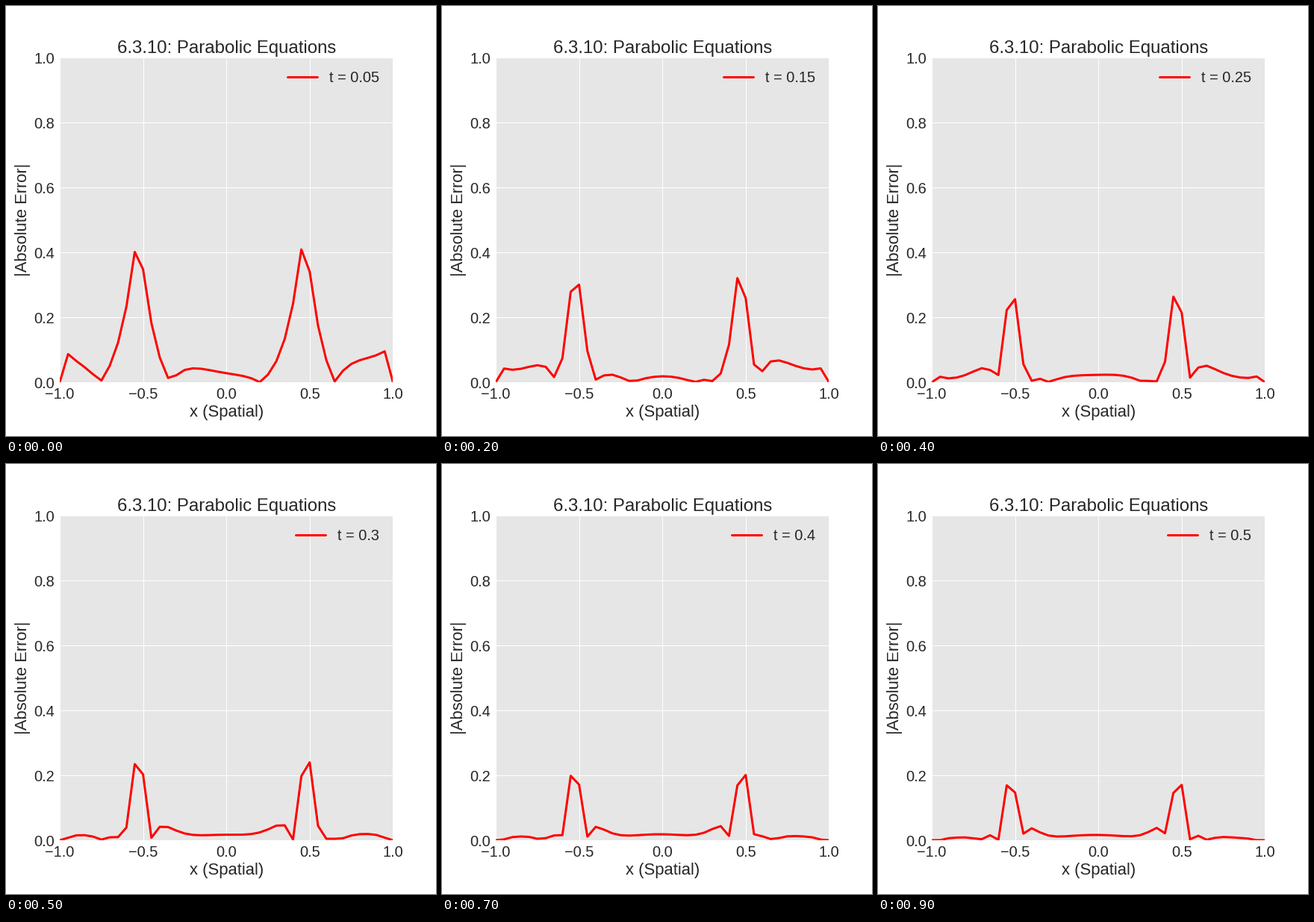
A matplotlib script for the animation above (1000 ms loop, 576 by 576 pixels).

```python
import numpy as np
import matplotlib.pyplot as plt
from matplotlib.animation import FuncAnimation

STEP = 0.05            # time step, equal to the grid spacing
FRAMES = 10
INK = "#262626"
x = np.linspace(-1, 1, 41)


def exact(t):
    """Fourier solution of u_t = u_xx for a square pulse on |x| < 1/2."""
    l = np.arange(60)
    freq = np.pi * (2 * l + 1)
    weights = 2 * (-1.0) ** l / freq * np.exp(-freq ** 2 * t)
    return 0.5 + np.cos(np.outer(x, freq)) @ weights


def crank_nicolson_errors():
    """Absolute error after each step; edges are refreshed after the solve."""
    n = len(x)
    mu = STEP / (x[1] - x[0]) ** 2
    laplacian = np.eye(n, k=1) - 2 * np.eye(n) + np.eye(n, k=-1)
    laplacian[[0, -1]] = 0
    implicit = np.eye(n) - mu / 2 * laplacian
    explicit = np.eye(n) + mu / 2 * laplacian
    u = np.zeros(n)
    u[10:30] = 1       # pulse on [-0.5, 0.5)
    errors = []
    for i in range(1, FRAMES + 1):
        u = np.linalg.solve(implicit, explicit @ u)
        truth = exact(i * STEP)
        u[[0, -1]] = truth[[0, -1]]
        errors.append(np.abs(u - truth))
    return errors


errors = crank_nicolson_errors()

plt.rcParams.update({
    "font.family": "Liberation Sans",
    "text.color": INK,
    "axes.labelcolor": INK,
    "toolbar": "None",
})
fig = plt.figure(figsize=(8, 8), dpi=72, facecolor="white")
ax = fig.add_axes([0.125, 0.125, 0.775, 0.755], facecolor="#E6E6E6")
ax.set(xlim=(-1, 1), ylim=(0, 1),
       xticks=np.linspace(-1, 1, 5), yticks=np.linspace(0, 1, 6))
ax.set_axisbelow(True)
ax.grid(color="white", linewidth=1)
ax.spines[:].set_visible(False)
ax.tick_params(length=0, pad=7, labelsize=20, labelcolor=INK)
ax.set_title("6.3.10: Parabolic Equations", fontsize=24, pad=6)
ax.set_xlabel("x (Spatial)", fontsize=22, labelpad=4)
ax.set_ylabel("|Absolute Error|", fontsize=22, labelpad=4)

curve, = ax.plot(x, errors[0], color="red", linewidth=3, label="t",
                 solid_capstyle="round", solid_joinstyle="round")
legend = ax.legend(loc="upper right", frameon=False, fontsize=20)
caption = legend.get_texts()[0]


def update(i):
    curve.set_ydata(errors[i])
    caption.set_text(f"t = {(i + 1) * STEP:g}")
    return curve, caption


anim = FuncAnimation(fig, update, frames=FRAMES, interval=100,
                     repeat=True, repeat_delay=0, blit=False)
plt.show()
```
